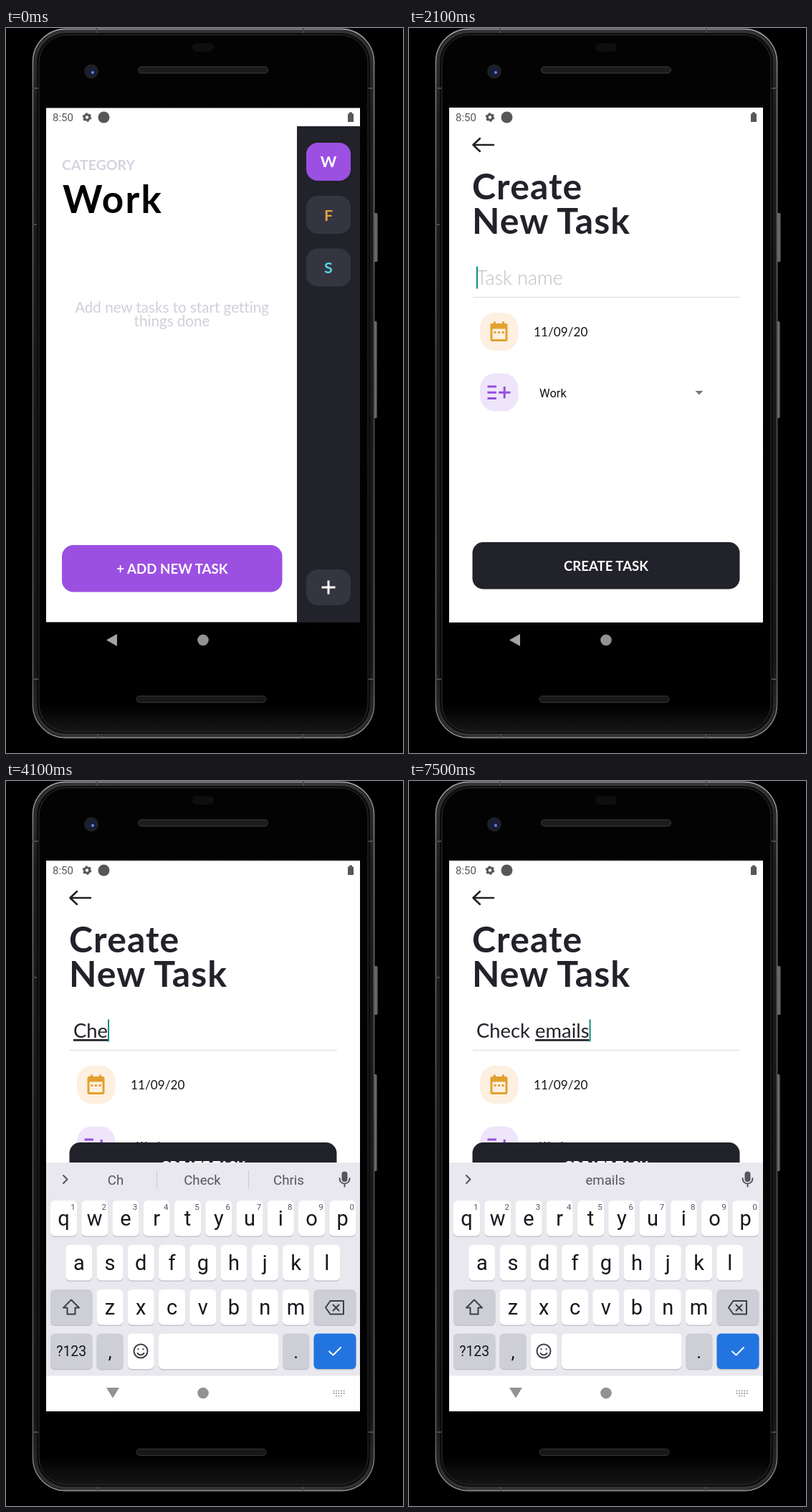
Animation, 554 px wide and 1011 px high, one loop 8 s. Source, as an HTML page:

```html
<!DOCTYPE html>
<html lang="en">
<head>
<meta charset="utf-8">
<title>Task app</title>
<style>
html,body{margin:0;width:100%;height:100%;overflow:hidden;background:#000}
svg{display:block}
text{font-family:Lato,sans-serif;white-space:pre;font-variant-ligatures:none}
.b{font-weight:700}
.m{text-anchor:middle}
.r,.r text{font-family:Roboto,sans-serif}
.line{fill:none;stroke-linecap:round;stroke-linejoin:round}
.hide{display:none}
#sheet,#inner,#page,#shade,#press,#create,#ime{animation:8s linear infinite}
#sheet{animation-name:sheet}
#inner{animation-name:inner}
#page{animation-name:page}
#shade{animation-name:shade}
#press{animation-name:press}
#create{animation-name:create}
#ime{animation-name:ime}
@keyframes sheet{
  0%{transform:translateY(717px)}
  17.156%{transform:translateY(717px);animation-timing-function:cubic-bezier(.2833,.99,.3183,.99)}
  22.9%,100%{transform:translateY(0)}
}
@keyframes inner{
  0%{transform:translateY(-687.6px)}
  17.156%{transform:translateY(-687.6px);animation-timing-function:cubic-bezier(.2833,.99,.3183,.99)}
  22.9%,100%{transform:translateY(0)}
}
@keyframes page{
  0%{transform:translateY(0)}
  17.156%{transform:translateY(0);animation-timing-function:cubic-bezier(.2833,.99,.3183,.99)}
  22.9%,100%{transform:translateY(-14.3px)}
}
@keyframes shade{0%,17.156%{opacity:0}17.675%,100%{opacity:.1}}
@keyframes press{0%,13.2%{opacity:1}14.9%,100%{opacity:.2}}
@keyframes create{0%,36%{transform:translateY(0)}36.01%,100%{transform:translateY(-213px)}}
@keyframes ime{
  0%,33.59%{transform:translateY(360px)}
  33.6%{transform:translateY(58px);animation-timing-function:ease-in-out}
  36%,100%{transform:translateY(0)}
}
</style>
</head>
<body>
<svg width="554" height="1011" viewBox="0 0 554 1011">
<defs>
  <clipPath id="app"><rect x="56" y="111.5" width="438" height="717"/></clipPath>
  <clipPath id="screen"><rect x="56" y="111.5" width="438" height="767.5"/></clipPath>
  <linearGradient id="rim" x2="0" y2="1">
    <stop offset="0" stop-color="#999"/><stop offset=".08" stop-color="#777"/>
    <stop offset=".5" stop-color="#4c4c4c"/><stop offset=".93" stop-color="#606060"/><stop offset="1" stop-color="#888"/>
  </linearGradient>
  <linearGradient id="band" x2="0" y2="1">
    <stop offset="0" stop-color="#333"/><stop offset=".12" stop-color="#1c1c1c"/>
    <stop offset=".9" stop-color="#161616"/><stop offset="1" stop-color="#333"/>
  </linearGradient>
  <linearGradient id="glass" x2="0" y2="1">
    <stop offset="0" stop-color="#030303"/><stop offset=".96" stop-color="#000"/><stop offset="1" stop-color="#161616"/>
  </linearGradient>
  <linearGradient id="side"><stop offset="0" stop-color="#222"/><stop offset=".6" stop-color="#777"/><stop offset="1" stop-color="#333"/></linearGradient>
  <g id="gear" fill="none" stroke="currentColor">
    <circle r="4.3" stroke-width="3.4"/><circle r="6.2" stroke-width="2.4" stroke-dasharray="3.2 3.29"/>
  </g>
  <g id="mic" class="line" stroke="#55565c" stroke-width="2">
    <rect x="-3" y="-9.5" width="6" height="12.5" rx="3" fill="#55565c"/>
    <path d="M-7-1c0 10 14 10 14 0M0 7v3.5"/>
  </g>
</defs>

<g id="phone">
  <rect x="512" y="258" width="7" height="68" rx="2" fill="url(#side)"/>
  <rect x="512" y="409" width="6" height="135" rx="2" fill="url(#side)"/>
  <rect x="37.5" y="1.5" width="476" height="988" rx="46" fill="#0a0a0a" stroke="url(#rim)" stroke-width="1.8"/>
  <rect x="41" y="5" width="469" height="981" rx="43" fill="none" stroke="url(#band)" stroke-width="4"/>
  <rect x="46" y="9.5" width="459" height="972" rx="39" fill="url(#glass)" stroke="#303030"/>
  <path d="M37 84h8M506 84h8M37 274h6M37 908h8M506 908h8M127 1v6M415 1v6M128 984v6M414 984v6" stroke="#4a4a4a" stroke-width="2"/>
  <rect x="260" y="21" width="30" height="12" rx="6" fill="#0e0e0e"/>
  <rect x="184.5" y="54" width="181" height="9" rx="4.5" fill="#1c1c1c" stroke="#3d3d3d"/>
  <rect x="182" y="931.5" width="181" height="9" rx="4.5" fill="#181818" stroke="#373737"/>
  <circle cx="119" cy="60.5" r="10" fill="#1e2026"/>
  <circle cx="119.5" cy="61" r="6" fill="#161d40"/>
  <circle cx="121" cy="62" r="2" fill="#6d86d4"/>
</g>

<g clip-path="url(#app)">
  <rect x="56" y="111" width="439" height="719" fill="#fff"/>
  <g id="page">
    <text class="b" x="78" y="198" font-size="19.5" fill="#d4d4e0">CATEGORY</text>
    <text class="b" x="79" y="258" font-size="53" letter-spacing="2.3">Work</text>
    <g class="m" font-size="20.6" fill="#d0d0da">
      <text x="231.5" y="397">Add new tasks to start getting</text>
      <text x="231.5" y="416">things done</text>
    </g>
    <g id="press">
      <rect x="78" y="721" width="307.5" height="65.5" rx="16" fill="#9c50e1"/>
      <text class="b m" x="232" y="760.5" font-size="18.7" fill="#fff">+ ADD NEW TASK</text>
    </g>
    <rect x="406" y="137" width="89" height="710" fill="#22222a"/>
    <rect x="419" y="160" width="62" height="53" rx="16" fill="#9c50e1"/>
    <g fill="#343540">
      <rect x="419" y="234" width="62" height="53" rx="16"/>
      <rect x="419" y="307.5" width="62" height="53" rx="16"/>
      <rect x="419" y="755" width="62" height="50" rx="16"/>
    </g>
    <g class="b m" font-size="21.5">
      <text x="450" y="194" fill="#fff">W</text>
      <text x="450" y="268.5" fill="#e6a238">F</text>
      <text x="450" y="342" fill="#55d5df">S</text>
    </g>
    <path d="M440.5 780h19M450 770.5v19" stroke="#fff" stroke-width="3"/>
  </g>
  <rect id="shade" x="56" y="111" width="439" height="719"/>
  <g id="sheet"><g clip-path="url(#app)"><g id="inner">
    <rect x="56" y="111" width="439" height="760" fill="#fff"/>
    <path class="line" d="M118 163H90m9-9l-9.5 9 9.5 9" stroke="#1f1f26" stroke-width="2.5"/>
    <g class="b" font-size="50" letter-spacing="1.1" fill="#22222a">
      <text x="88" y="239">Create</text>
      <text x="88" y="287">New Task</text>
    </g>
    <text id="hint" x="94" y="358" font-size="27" font-weight="300" fill="#bdbdc4">Task name</text>
    <text id="input" x="94" y="358" font-size="27.4" fill="#22222a"><tspan></tspan><tspan text-decoration="underline"></tspan></text>
    <rect id="caret" y="332.5" width="2" height="31" fill="#0b8f80"/>
    <path d="M89 375.5H462" stroke="#e3e3e8" stroke-width="1.5"/>
    <rect x="99" y="397" width="53.5" height="53" rx="21" fill="#fdf0e1"/>
    <g fill="#e2a12f">
      <path fill-rule="evenodd" d="M116 412h2v-2.5h3v2.5h9v-2.5h3v2.5h2a2.5 2.5 0 0 1 2.5 2.5v20a2.5 2.5 0 0 1-2.5 2.5h-19a2.5 2.5 0 0 1-2.5-2.5v-20a2.5 2.5 0 0 1 2.5-2.5zm.5 7.5v14.5h18v-14.5z"/>
      <path d="M118.5 423h3v3h-3zm5.5 0h3v3h-3zm5.5 0h3v3h-3z"/>
    </g>
    <text x="174" y="430" font-size="17.2" fill="#16161a">11/09/20</text>
    <rect x="99" y="481.5" width="53.5" height="53" rx="21" fill="#eee5fb"/>
    <path d="M109.5 500h12.5M109.5 508.3h12.5M109.5 516.6h12.5M125 508.3h16.5M133.2 500v16.6" stroke="#9550de" stroke-width="3"/>
    <text class="r" x="182" y="515" font-size="16.5" fill="#111">Work</text>
    <path d="M399.5 506h11l-5.5 5.5z" fill="#777"/>
    <g id="create">
      <rect x="88.5" y="717" width="373" height="65.5" rx="15" fill="#22222a"/>
      <text class="b m" x="275" y="756.5" font-size="18.6" fill="#fff">CREATE TASK</text>
    </g>
  </g></g></g>
  <g id="status" opacity=".66">
    <text class="r" x="65" y="130" font-size="15">8:50</text>
    <use href="#gear" transform="translate(113 124.5) scale(.86)"/>
    <circle cx="136.5" cy="124.5" r="8"/>
    <path d="M477 119.5h2v-2h4v2h2v11.5h-8z"/>
  </g>
</g>

<g clip-path="url(#screen)">
  <g id="ime" class="r">
    <rect x="56" y="532" width="439" height="298" fill="#e9e8ee"/>
    <rect x="56" y="829.5" width="439" height="51" fill="#fff"/>
    <g id="tools">
      <path class="line" d="M86 550l-5 5.5 5 5.5" stroke="#55565c" stroke-width="2"/>
      <g class="line" stroke="#55565c" stroke-width="2">
        <path d="M135 547.5h12a2 2 0 0 1 2 2v8l-5.5 5.5h-8.5a2 2 0 0 1-2-2v-11.5a2 2 0 0 1 2-2zM149 557.5h-5.5v5.5M138 551.5v1M144 551.5v1M137 556q3 3 5 1"/>
        <rect x="260" y="548" width="15" height="16" rx="1.5"/>
        <path d="M265 547.5h5M264 553h7M264 556.5h7M264 560h4"/>
      </g>
      <text class="b m" x="203.5" y="560.5" font-size="14" letter-spacing="1" fill="#55565c">GIF</text>
      <use href="#gear" transform="translate(331 556) scale(1.25)" color="#55565c"/>
      <path d="M369.5 543.5v25" stroke="#d2d2d8"/>
    </g>
    <g id="words">
      <path class="line" d="M80 550l5.5 5.5-5.5 5.5" stroke="#55565c" stroke-width="2"/>
      <path id="bars" d="M210.5 543v26M338.5 543v26" stroke="#cfcfd5" stroke-width="1.3"/>
      <g class="m" font-size="18.7" fill="#55565c">
        <text x="153" y="562.5"></text><text x="274" y="562.5"></text><text x="394.5" y="562.5"></text>
      </g>
    </g>
    <use href="#mic" x="472.5" y="555"/>
    <g id="keys" class="m"></g>
    <g class="line" stroke="#3e3f45" stroke-width="2">
      <path id="shift" d="M91 723.5l11 11h-5.5v9h-11v-9h-5.5z"/>
      <path d="M452.5 725h18.5v18.5h-18.5l-6.5-9.25zM456.5 730.5l8 8m0-8l-8 8"/>
      <circle cx="188" cy="795" r="9.5"/>
      <path d="M184.5 792v.5M191.5 792v.5M183.5 798q4.5 5 9 0"/>
      <path d="M451 795.5l5.5 5 10.5-10.5" stroke="#fff"/>
    </g>
  </g>
  <g id="nav" fill="#929292">
    <path id="back" d="M140 853.5l15-8.5v17z" fill="#a4a4a4"/>
    <path id="down" d="M140 846h18l-9 14.5z"/>
    <circle cx="275" cy="853.5" r="7.8"/>
    <path id="pad" d="M456.5 850.5h16M456.5 853.8h16M460 857.5h9" fill="none" stroke="#8c8c8c" stroke-width="1.7" stroke-dasharray="1.8 1.75"/>
  </g>
</g>
</svg>
<script>
const $ = id => document.getElementById(id);
const NS = 'http://www.w3.org/2000/svg';
const LOOP = 8000;

function add(tag, attrs, text = '') {
  const el = document.createElementNS(NS, tag);
  for (const k in attrs) el.setAttribute(k, attrs[k]);
  el.textContent = text;
  return $('keys').appendChild(el);
}

function key(x, y, w, fill = '#fff', label = '', size = 29) {
  add('rect', {x, y: y + 1.5, width: w, height: 49.5, rx: 6, fill: '#c3c3c9'});
  add('rect', {x, y, width: w, height: 49.5, rx: 6, fill});
  return add('text', {x: x + w / 2, y: y + (size < 25 ? 31.5 : 34.5), 'font-size': size, fill: '#17181c'}, label);
}

const PITCH = 43.25, GREY = '#cdced6';
const letters = [];
[['qwertyuiop', 62, 585], ['asdfghjkl', 83.3, 647], ['zxcvbnm', 126.5, 709]].forEach(([row, x0, y], r) => {
  [...row].forEach((c, i) => {
    const x = x0 + i * PITCH;
    letters.push([key(x, y, 37, '#fff', c), c]);
    if (!r) add('text', {x: x + 31.5, y: 597.5, 'font-size': 11.5, fill: '#55565c'}, (i + 1) % 10);
  });
});
key(62, 709, 58.5, GREY);
key(429.5, 709, 59, GREY);
key(62, 770.5, 58.5, GREY, '?123', 19.5);
key(126.5, 770.5, 37, GREY, ',', 26);
key(169.7, 770.5, 37);
key(213, 770.5, 167.5);
key(386.3, 770.5, 37, GREY, '.', 26);
key(429.5, 770.5, 59, '#2274e0');

// [from ms, committed text, composing text, suggestions]
const steps = [
  [0, '', '', ''],
  [3680, '', 'C', 'C|Can|Call'],
  [3880, '', 'Ch', 'C|Can|Call'],
  [3980, '', 'Ch', 'Ch|Check|Chris'],
  [4080, '', 'Che', 'Ch|Check|Chris'],
  [4180, '', 'Che', 'Che|Check|Chess'],
  [4280, '', 'Chec', 'Che|Check|Chess'],
  [4480, '', 'Check', 'Chec|Check|Checked'],
  [4580, '', 'Check', 'Check|Checked|Checking'],
  [4980, 'Check ', '', 'out|in|the'],
  [5180, 'Check ', 'e', 'out|in|the'],
  [5380, 'Check ', 'em', 'e|every|each'],
  [5580, 'Check ', 'ema', 'em|email|emails'],
  [5680, 'Check ', 'ema', 'ema|email|emails'],
  [5780, 'Check ', 'emaa', 'ema|email|emails'],
  [5880, 'Check ', 'emaa', 'emaa|email|emails'],
  [6280, 'Check ', 'ema', 'emaa|email|emails'],
  [6380, 'Check ', 'ema', 'ema|email|emails'],
  [7080, 'Check ', 'emai', 'ema|email|emails'],
  [7180, 'Check ', 'emai', 'emai|email|emails'],
  [7280, 'Check ', 'email', 'emai|email|emails'],
  [7380, 'Check ', 'email', 'email|emails|emailed'],
  [7480, 'Check ', 'emails', '|emails|']
];
const [done, composing] = $('input').children;
const words = $('words').querySelectorAll('text');
const show = (id, on) => $(id).classList.toggle('hide', !on);
const within = (t, a, b) => t >= a && t < b;
let current;

function type(step) {
  const [, text, draft, list] = current = step;
  const typed = text + draft !== '';
  done.textContent = text;
  composing.textContent = draft;
  list.split('|').forEach((w, i) => words[i].textContent = w);
  show('bars', !list.startsWith('|'));
  show('hint', !typed);
  show('tools', !typed);
  show('words', typed);
  letters.forEach(([el, c]) => el.textContent = typed ? c : c.toUpperCase());
  $('shift').setAttribute('fill', typed ? 'none' : '#3e3f45');
  $('caret').setAttribute('x', 94 + (typed ? $('input').getComputedTextLength() : 0));
}

let start;
function tick(now) {
  start ??= now;
  const t = (now - start) % LOOP;
  const step = steps.findLast(s => s[0] <= t);
  if (step !== current) type(step);
  show('caret', within(t, 2080, 2680) || within(t, 3180, 6880) || t >= 7080);
  show('back', t < 2780);
  show('down', t >= 2780);
  show('pad', t >= 2380);
  requestAnimationFrame(tick);
}
type(steps[0]);
requestAnimationFrame(tick);
</script>
</body>
</html>
```
